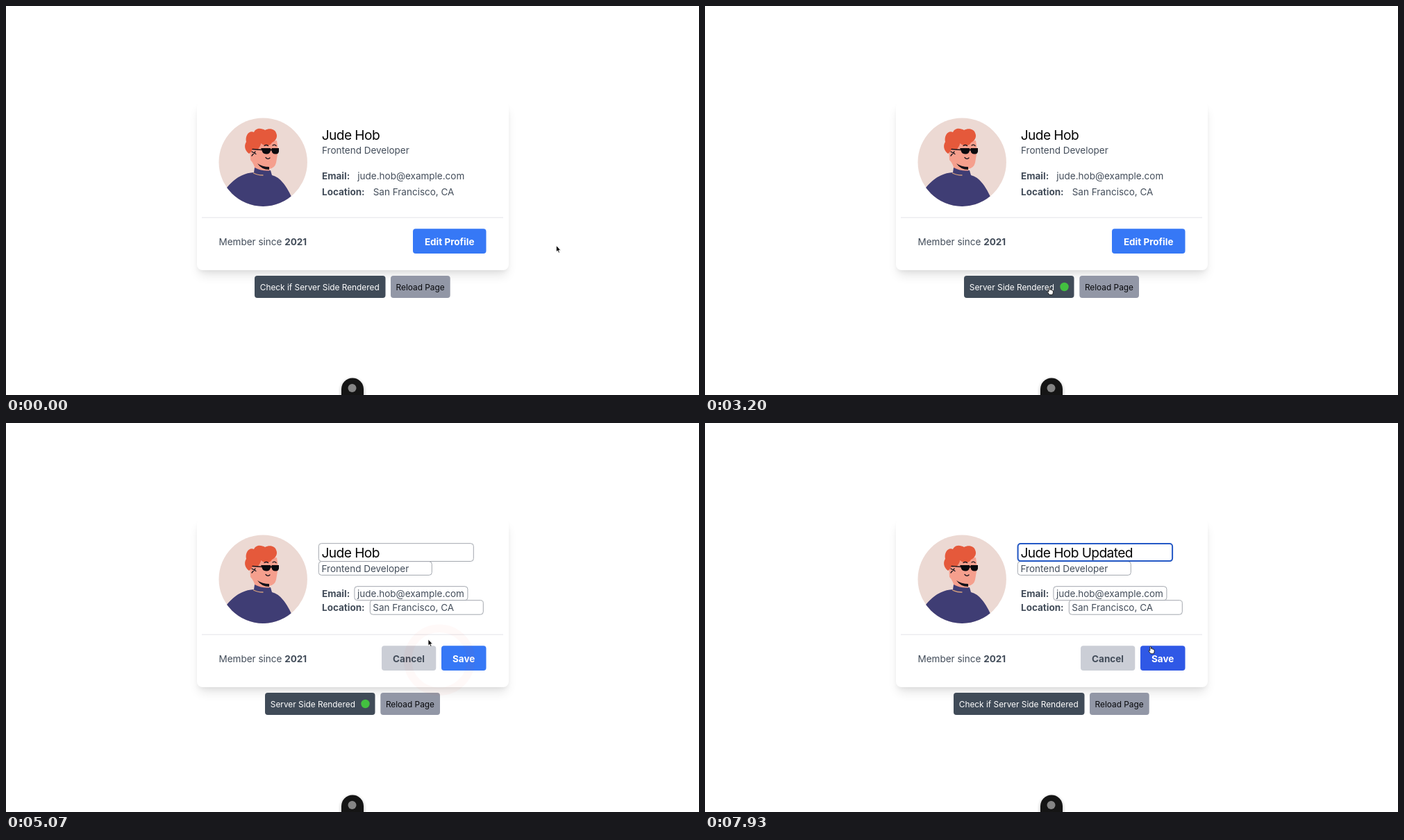
An HTML page for the animation above (8 s loop, 998x561 px).

```html
<!DOCTYPE html>
<html lang="en">
<head>
<meta charset="utf-8">
<title>Profile card</title>
<style>
  html, body { margin: 0; width: 100%; height: 100%; overflow: hidden; background: #fff; }
  .card {
    position: absolute; left: 274.5px; top: 137.5px; width: 449px; height: 243.5px;
    border-radius: 8px; background: #fff;
    box-shadow: 0 10px 15px -3px rgba(0,0,0,.11), 0 4px 6px -2px rgba(0,0,0,.06);
  }
  svg { position: absolute; left: 0; top: 0; width: 998px; height: 561px; }
  text {
    font: 13.5px Inter, "Liberation Sans", sans-serif;
    font-optical-sizing: none; fill: #434d5a; white-space: pre;
  }
  .name { font-size: 19.2px; letter-spacing: -.6px; fill: #060606; }
  .b { font-weight: 700; }
  .s { font-size: 11.85px; }
  .mid { text-anchor: middle; }
  .white { fill: #fff; }
  .field { fill: #fff; stroke: #a3a7ae; }
</style>
</head>
<body>
<div class="card"></div>
<svg viewBox="0 0 998 561">
  <defs>
    <clipPath id="round"><circle cx="370.2" cy="225.2" r="63.7"/></clipPath>
    <filter id="soft" x="-50%" y="-50%" width="200%" height="200%"><feGaussianBlur stdDeviation="2.5"/></filter>
  </defs>

  <g clip-path="url(#round)">
    <path fill="#ecd9d3" d="M306 161h129v129H306z"/>
    <path fill="#f59f8d" d="M351 205L352 222Q358 228 359 238L370 243L382 242L379 235Q387 234 389 226L392 208L390 194L358 196Z"/>
    <path fill="#15131b" d="M362 227Q369 232 379 232L379 236Q368 236 362 227Z"/>
    <path fill="#e5593b" d="M350 213C343 208 343 200 346 196C344 187 350 179 357 182C360 175 368 176 373 179C380 175 388 178 389 183C392 189 388 195 383 197C380 203 372 202 367 198C367 203 363 204 363 208C359 206 354 206 353 210Z"/>
    <path fill="#3f3d74" d="M358 233Q370 239 381 237L383 244Q398 247 411 275V290H318V262Q335 241 357 240Z"/>
    <g fill="none" stroke="#15131b" stroke-width="1.3" stroke-linecap="round">
      <path stroke="#d8a27d" d="M356.500 241Q362 244 370 244"/>
      <path d="M355 206.500L369 207.500M354 210L360 213.500M359 210L354 216M372 201.500Q375 199.500 377.500 201.500M384 201Q387 199 389 201.500M374 218.500Q377 222 380 219"/>
    </g>
    <path fill="#0b0a0e" d="M367 205H381V206.500H382.500V205H393V210Q392 214 388 213.500Q383 213.500 382.500 208.500H381Q380 214 374.500 213.500Q369 213 368.500 208Z"/>
  </g>

  <path fill="#e9e9ed" d="M282 304.500H716V305.700H282z"/>
  <text x="306.500" y="344.800">Member since <tspan class="b">2021</tspan></text>
  <text class="b" x="455" y="250" id="emailLabel">Email:</text>
  <text class="b" x="455" y="272.500" id="placeLabel">Location:</text>

  <g id="view">
    <text class="name" x="454.700" y="192.800">Jude Hob</text>
    <text x="455" y="213.300">Frontend Developer</text>
    <text x="506.300" y="250">jude.hob@example.com</text>
    <text x="528.700" y="272.500">San Francisco, CA</text>
    <rect id="editBtn" x="586" y="321.300" width="105.500" height="35.700" rx="4"/>
    <text class="b mid white" x="638.700" y="344.800">Edit Profile</text>
  </g>

  <g id="edit">
    <rect class="field" x="450.300" y="173.700" width="223" height="25.800" rx="4"/>
    <rect class="field" x="450.300" y="199.700" width="163" height="19.700" rx="4"/>
    <rect class="field" x="501.900" y="235.700" width="163" height="20" rx="4"/>
    <rect class="field" x="524.300" y="255.700" width="163" height="20.500" rx="4"/>
    <rect id="focus" x="450.600" y="174.100" width="222.500" height="25" rx="4" fill="none" stroke="#2459c6" stroke-width="2"/>
    <text class="name" id="name" x="454.500" y="194"></text>
    <path id="caret" d="M0 176.500V198" stroke="#111" stroke-width="1"/>
    <text x="454.500" y="214.800">Frontend Developer</text>
    <text x="506" y="251.200">jude.hob@example.com</text>
    <text x="528.300" y="271.300">San Francisco, CA</text>
    <rect id="cancelBtn" x="541" y="321.300" width="78.300" height="35.700" rx="4"/>
    <text class="b mid" x="580" y="344.800">Cancel</text>
    <rect id="saveBtn" x="627" y="321.300" width="64.500" height="35.700" rx="4"/>
    <text class="b mid white" x="659.200" y="344.800">Save</text>
  </g>

  <rect id="checkBtn" y="389" height="32" rx="4" fill="#404b58"/>
  <text class="s white" id="checkText" y="409.600"></text>
  <circle id="dot" cx="517.500" cy="405" r="6.200" fill="#43c040"/>
  <rect id="reloadBtn" y="389" width="85.700" height="32" rx="4" fill="#9297a6"/>
  <text class="s" id="reloadText" y="409.600" style="fill:#08090c">Reload Page</text>

  <rect x="483" y="538.500" width="32" height="40" rx="16" fill="#000" opacity=".35" filter="url(#soft)"/>
  <rect x="483" y="536.500" width="32" height="42" rx="16" fill="#151515"/>
  <circle cx="498.500" cy="551" r="6" fill="#858585"/>

  <circle id="ring" fill="none" stroke="#e8281f"/>
  <g id="cursor">
    <path id="arrow" fill="#000" stroke="#fff" stroke-width=".7" d="M0 0V9L2 7.200L3.400 10.500L4.900 9.900L3.500 6.700H6.200Z"/>
    <path id="hand" fill="#fff" stroke="#111" stroke-width=".9" stroke-linejoin="round" d="M-.9 5.500V.6Q0-.7 .9 .6V3.600Q2-.2 2.800 3.900Q3.900 3.200 4.300 4.400Q5.400 4 5.500 5.300V7.500L4.600 10.500H.3L-2.800 6.500Q-2.700 4.800-.9 6.200Z"/>
    <path id="beam" fill="none" stroke="#222" stroke-width="1" d="M-2-5Q0-5 0-4Q0-5 2-5M0-4V4M-2 5Q0 5 0 4Q0 5 2 5M-1 1H1"/>
  </g>
</svg>
<script>
const LOOP = 8000;
const $ = Object.fromEntries([...document.querySelectorAll('svg [id]')].map(e => [e.id, e]));

// time, x, y of the pointer; equal neighbours hold still
const PATH = [
  [0, 792.5, 345.5], [730, 792.5, 345.5], [1060, 640, 382], [1400, 500.8, 408], [2640, 500.8, 408],
  [2850, 536, 394], [3020, 520, 411], [3200, 496, 406], [3300, 488, 408], [3400, 497, 406.5],
  [3640, 497, 406.5], [3840, 540, 427], [4050, 640, 405], [4220, 684, 362], [4410, 623.5, 340.5],
  [4850, 623.5, 340.5], [5020, 612, 330], [5330, 588, 197], [5440, 586.3, 193.5],
  [7570, 586.3, 193.5], [7770, 612, 255], [7930, 641.5, 322], [8000, 647, 331]
];
const CLICKS = [[1410, 501.5, 410], [4450, 624, 341.7], [5688, 586.2, 193.7]];
const RIPPLE = 640;
const TYPED = [[6400, 2], [6530, 3], [6670, 4], [6800, 5], [6930, 6], [7000, 7], [7200, 8]];
const CHECK = [
  [0, 358, 188.5, 554, 'Check if Server Side Rendered'],
  [1440, 412.2, 79.4, 499.7, 'Checking...'],
  [2400, 373, 158.5, 539.3, 'Server Side Rendered'],
  [6400, 358, 188.5, 554, 'Check if Server Side Rendered']
];

const latest = (table, t) => table.filter(r => r[0] <= t).pop();
const set = (el, attrs) => { for (const k in attrs) el.setAttribute(k, attrs[k]); };
const show = (el, on) => { el.style.display = on ? '' : 'none'; };

function slope(i, k) {
  const a = PATH[i - 1], b = PATH[i], c = PATH[i + 1];
  if (!a || !c) return 0;
  const still = (p, q) => p[1] === q[1] && p[2] === q[2];
  return still(a, b) || still(b, c) ? 0 : (c[k] - a[k]) / (c[0] - a[0]);
}

function pointer(t) {
  let i = 0;
  while (i < PATH.length - 2 && PATH[i + 1][0] <= t) i++;
  const a = PATH[i], b = PATH[i + 1], d = b[0] - a[0], u = (t - a[0]) / d;
  return [1, 2].map(k => {
    const s = u * u * (3 - 2 * u);
    return a[k] + (b[k] - a[k]) * s +
      d * u * (1 - u) * ((1 - u) * slope(i, k) - u * slope(i + 1, k));
  });
}

function inside(el, x, y) {
  const n = k => +el.getAttribute(k);
  return x >= n('x') && x <= n('x') + n('width') && y >= n('y') && y <= n('y') + n('height');
}

function draw(t) {
  const editing = t >= 4460;
  show($.view, !editing);
  show($.edit, editing);
  set($.emailLabel, { y: editing ? 251.2 : 250 });
  set($.placeLabel, { y: editing ? 271.3 : 272.5 });

  const [, left, width, reload, label] = latest(CHECK, t);
  set($.checkBtn, { x: left, width });
  set($.checkText, { x: left + 7.8 });
  $.checkText.textContent = label;
  show($.dot, label.startsWith('Server'));
  set($.reloadBtn, { x: reload });
  set($.reloadText, { x: reload + 7.6 });

  if (editing) {
    const typed = latest(TYPED, t);
    $.name.textContent = 'Jude Hob' + ' Updated'.slice(0, typed ? typed[1] : 0);
    show($.focus, t >= 5690);
    const blinkOn = (t >= 5690 && t < 6130) || (t >= 6400 && t < 7700);
    show($.caret, blinkOn);
    if (blinkOn) set($.caret, { transform: `translate(${454.8 + $.name.getComputedTextLength()} 0)` });
  }

  const [x, y] = pointer(t);
  const over = el => inside(el, x, y);
  const onEdit = !editing && over($.editBtn);
  const onCancel = editing && over($.cancelBtn);
  const onSave = editing && over($.saveBtn);
  set($.editBtn, { fill: onEdit ? '#2f58e6' : '#3678f6' });
  set($.cancelBtn, { fill: onCancel ? '#9ca2ae' : '#cbced6' });
  set($.saveBtn, { fill: onSave ? '#2f58e6' : '#3678f6' });

  const hand = onEdit || onCancel || onSave || over($.checkBtn) || over($.reloadBtn);
  const beam = editing && [...document.querySelectorAll('.field')].some(over);
  show($.hand, hand);
  show($.beam, beam && !hand);
  show($.arrow, !beam && !hand);
  show($.cursor, t < 6400 || t >= 7600);
  set($.cursor, { transform: `translate(${x} ${y})` });

  const click = CLICKS.find(c => t >= c[0] && t < c[0] + RIPPLE);
  show($.ring, click);
  if (click) {
    const age = t - click[0];
    set($.ring, {
      cx: click[1], cy: click[2], r: 5.75 + age * .064,
      'stroke-width': 11.5, opacity: .95 * (1 - age / RIPPLE)
    });
  }
}

const start = performance.now();
function tick() {
  draw((performance.now() - start) % LOOP);
  requestAnimationFrame(tick);
}
tick();
</script>
</body>
</html>
```
